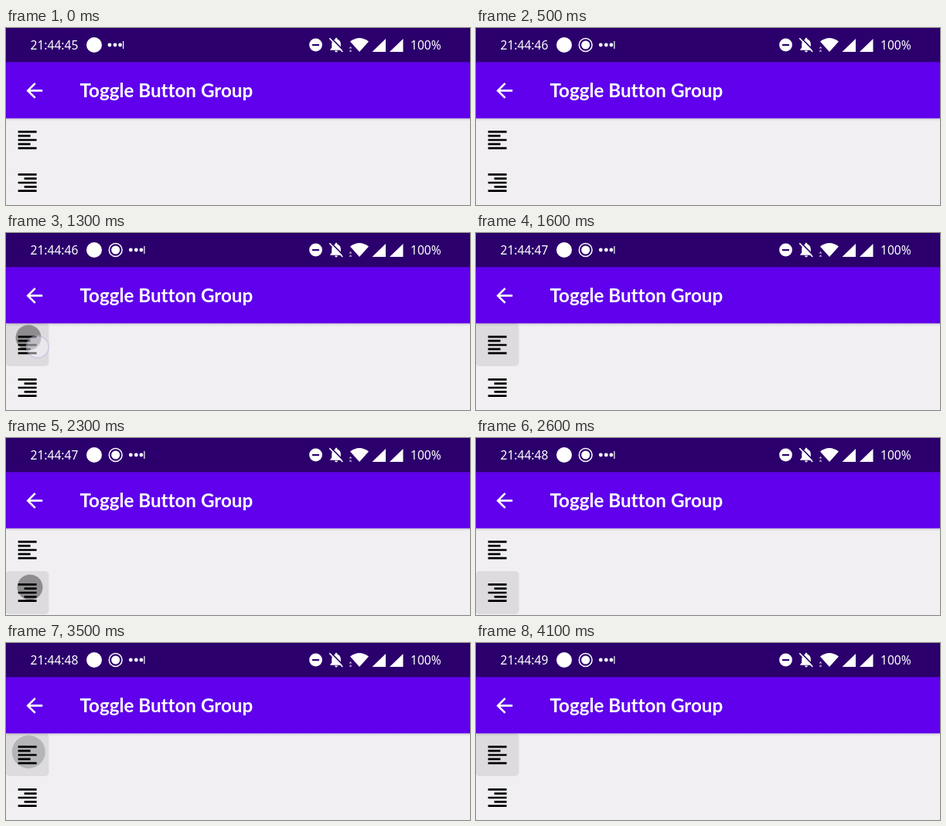
Write an HTML page that moves like this. It is 600 px wide and 230 px high and loops after 4600 ms.

```html
<!DOCTYPE html>
<html lang="en">
<head>
<meta charset="utf-8">
<title>Toggle Button Group</title>
<style>
  html, body { margin: 0; width: 100%; height: 100%; overflow: hidden; background: #f1eff2; }
  svg { display: block; }
  text { fill: #fff; font: 15.6px "Noto Sans", sans-serif; }
  .title { font: 700 24.2px Lato, sans-serif; font-variant-ligatures: none; }
</style>
</head>
<body>
<svg width="600" height="230" viewBox="0 0 600 230">
  <defs>
    <linearGradient id="shadow" x2="0" y2="1">
      <stop stop-color="#000" stop-opacity=".14"/>
      <stop offset="1" stop-color="#000" stop-opacity="0"/>
    </linearGradient>
  </defs>
  <rect width="600" height="230" fill="#f1eff2"/>

  <rect id="selected" x="-.5" width="56" height="56" rx="5" fill="#dddbde"/>
  <g stroke="#000" stroke-width="2.67" transform="translate(-.4)">
    <path d="M16 134.8h24m-24 5.3h16m-16 5.4h24m-24 5.3h16m-16 5.4h24"/>
    <path d="M16 190.3h24m-16 5.3h16m-24 5.4h24m-16 5.3h16m-24 5.4h24"/>
  </g>
  <circle id="ripple"/>
  <circle id="pointer" r="14.3" fill="#f8f6fc" fill-opacity=".92" stroke="#c6bfe3" stroke-width="2"/>

  <rect y="117" width="600" height="4" fill="url(#shadow)"/>
  <rect y="44" width="600" height="73.4" fill="#6000ec"/>
  <rect width="600" height="44.3" fill="#2b006c"/>
  <path transform="translate(21.2 65.8) scale(1.3)" fill="#fff"
    d="M20 11H7.83l5.59-5.59L12 4l-8 8 8 8 1.41-1.41L7.83 13H20z"/>
  <text class="title" x="95.5" y="90">Toggle Button Group</text>

  <text id="clock" x="31.5" y="28"></text>
  <g fill="#fff">
    <circle cx="114" cy="22" r="10"/>
    <g id="record">
      <circle r="8.4" fill="none" stroke="#fff" stroke-width="1.5"/>
      <circle r="5.5"/>
    </g>
    <g id="more">
      <circle cx="134" cy="22" r="2.4"/>
      <circle cx="141" cy="22" r="2.4"/>
      <circle cx="147.6" cy="22" r="2.4"/>
      <path d="M151 17h1.2v10h-1.2z"/>
    </g>
    <circle cx="400.5" cy="22" r="8.4"/>
    <path d="M396 21h9v2.2h-9z" fill="#2b006c"/>
    <g transform="translate(415.4 10.2) scale(.97)">
      <path d="M12 22c1.1 0 2-.9 2-2h-4c0 1.1.9 2 2 2zm6-6v-5c0-3.07-1.63-5.64-4.5-6.32V4c0-.83-.67-1.5-1.5-1.5s-1.5.67-1.5 1.5v.68C7.64 5.36 6 7.92 6 11v5l-2 2v1h16v-1l-2-2z"/>
      <path d="M4.5 2L22 20" stroke="#2b006c" stroke-width="1.6"/>
      <path d="M3 3.2L20.5 21.5" stroke="#fff" stroke-width="1.7"/>
    </g>
    <path d="M445 17.5Q457 8.5 469 17.5L457 31z"/>
    <path d="M445.5 28l2 2.7h-4zM447.5 26.5h-4l2-2.7z" opacity=".65"/>
    <path d="M491 14v17h-17.5zM513.5 14v17H496z"/>
  </g>
  <text x="523" y="28">100%</text>
</svg>
<script>
const LOOP = 4600, STEP = 100;
const $ = id => document.getElementById(id);
const clamp = v => Math.min(1, Math.max(0, v));
const set = (id, attrs) => {
  for (const key in attrs) $(id).setAttribute(key, attrs[key]);
};

// Each tap: row, time of selection, ripple start, optional pointer position
const taps = [
  { row: 0, at: 1300, x: 29, y: 136, pointer: [41, 148] },
  { row: 1, at: 2300, x: 31, y: 194 },
  { row: 0, at: 3400, x: 31, y: 138, pointer: [52, 149] }
];

function draw(t) {
  const second = t < 500 ? 45 : 46 + Math.floor(clamp((t - 600) / 3000) * 3);
  $("clock").textContent = "21:44:" + second;

  const entry = 1 - (1 - clamp(t / 400)) ** 2;
  set("record", { transform: `translate(141.7 22) scale(${entry})`, opacity: entry });
  set("more", { transform: `translate(${27.3 * entry})` });

  const current = taps.filter(tap => t >= tap.at).pop();
  set("selected", { y: current ? 117 + 56 * current.row : 0, opacity: current ? 1 : 0 });

  const age = current ? t - current.at : LOOP;
  const grow = clamp(age / 200);
  if (age < 200) {
    set("ripple", {
      cx: current.x + (27.5 - current.x) * grow,
      cy: current.y + (145 + 56 * current.row - current.y) * grow,
      r: 16.5 + 10 * grow
    });
  }
  set("ripple", { opacity: age < 200 ? .36 * (1 - grow) : 0 });

  const touch = taps.find(tap => tap.pointer && t >= tap.at - 100 && t < tap.at + 200);
  if (touch) set("pointer", { cx: touch.pointer[0], cy: touch.pointer[1] });
  set("pointer", { opacity: touch ? clamp(1 - (t - touch.at + 100) / 200) : 0 });
}

const start = performance.now();
function tick() {
  const t = (performance.now() - start) % LOOP;
  draw(Math.floor(t / STEP) * STEP);
  requestAnimationFrame(tick);
}
tick();
</script>
</body>
</html>
```
